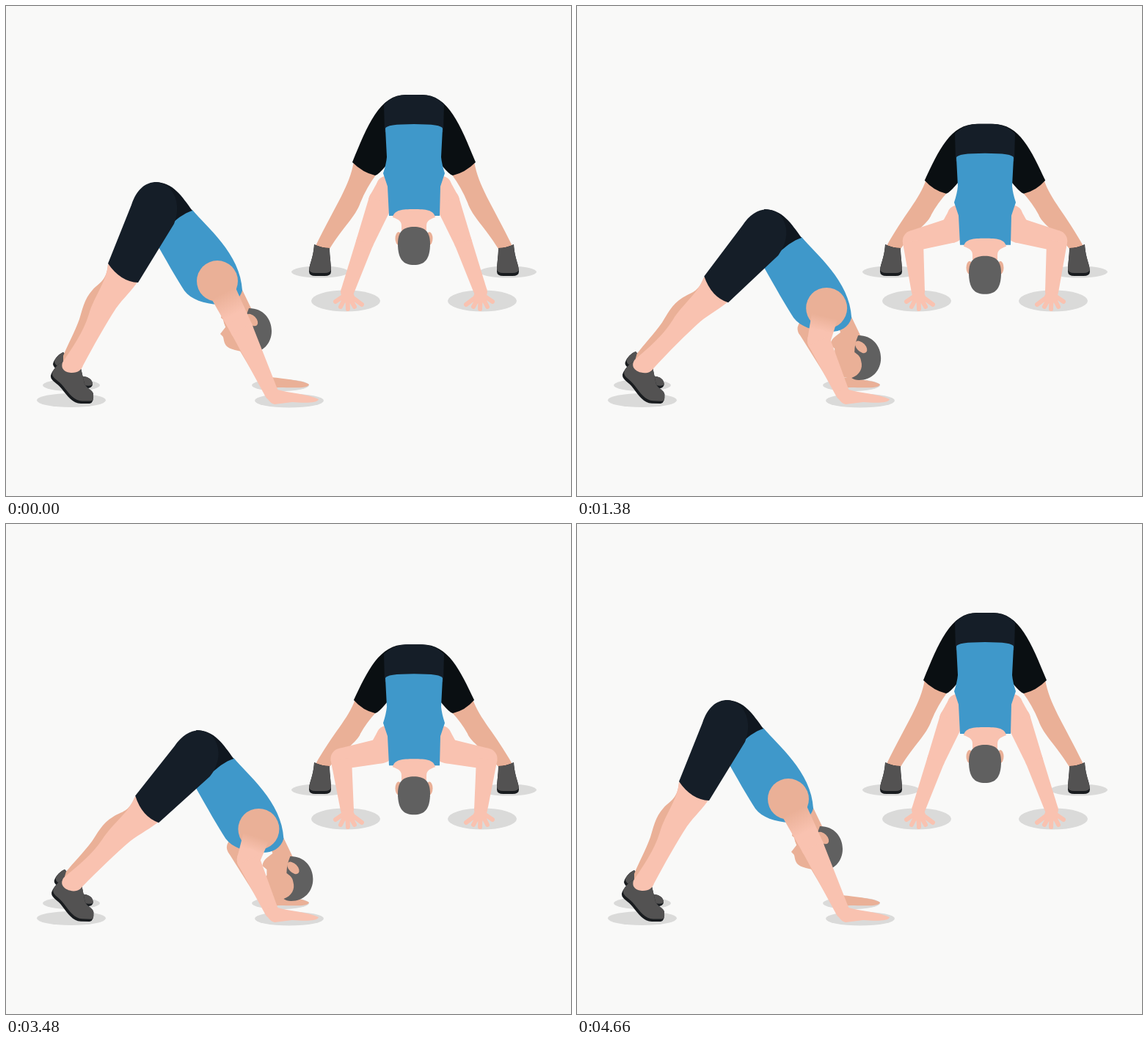
Recreate the animation shown at these times as an HTML page with a canvas. Size 770 by 668 pixels, loop 5.36 s.

```html
<!DOCTYPE html>
<html lang="en">
<head>
<meta charset="utf-8">
<title>Push-up exercise</title>
<style>
html, body { margin: 0; height: 100%; overflow: hidden; background: #f9f9f8; }
canvas { display: block; }
</style>
</head>
<body>
<canvas id="stage" width="770" height="668"></canvas>
<script>
const ctx = document.getElementById('stage').getContext('2d');
const LOOP = 5360, STEPS = 31, LEAN = 21.3 * Math.PI / 180;
const BG = '#f9f9f8', SHADE = '#dadad9', PINK = '#f9c2b0', TAN = '#eab097',
  BLUE = '#3f98ca', SHORTS = '#151e28', PELVIS = '#10171f', BLACK = '#0a0f12',
  HAIR = '#606060', SHOE = '#535252', SOLE = '#191c1f';

const mix = (a, b, p) => a + (b - a) * p;

function fill(path, color) {
  ctx.fillStyle = color;
  ctx.fill(new Path2D(path));
}

function oval(x, y, rx, ry, color, turn = 0) {
  ctx.fillStyle = color;
  ctx.beginPath();
  ctx.ellipse(x, y, rx, ry, turn, 0, 7);
  ctx.fill();
}

// Tapered limb through joints given as [x, y, radius].
function limb(joints, color) {
  joints.forEach(([x, y, r], i) => {
    oval(x, y, r, r, color);
    if (!i) return;
    const [px, py, pr] = joints[i - 1];
    const len = Math.hypot(x - px, y - py);
    const nx = (py - y) / len, ny = (x - px) / len;
    ctx.beginPath();
    ctx.moveTo(px + nx * pr, py + ny * pr);
    ctx.lineTo(x + nx * r, y + ny * r);
    ctx.lineTo(x - nx * r, y - ny * r);
    ctx.lineTo(px - nx * pr, py - ny * pr);
    ctx.fill();
  });
}

function moved(x, y, draw) {
  ctx.save();
  ctx.translate(x, y);
  draw();
  ctx.restore();
}

function turned(x, y, angle, draw) {
  ctx.save();
  ctx.translate(x, y);
  ctx.rotate(angle);
  ctx.translate(-x, -y);
  draw();
  ctx.restore();
}

function bothSides(draw) {
  draw();
  ctx.save();
  ctx.translate(1112, 0);
  ctx.scale(-1, 1);
  draw();
  ctx.restore();
}

function shoe(path, dx, dy) {
  fill(path, SOLE);
  ctx.save();
  ctx.clip(new Path2D(path));
  moved(dx, dy, () => fill(path, SHOE));
  ctx.restore();
}

function sideHead() {
  fill('M302 395L321 385L334 412L346 435L330 472C318 471 304 468 300 463C296 458 297 451 295 450L292 447L299 438V430L293 425C294 416 301 413 307 408Z', TAN);
  fill('M331 412C351 412 362 427 362 443C362 460 350 473 332 473Q326 473 322 470C333 466 338 457 335 447C334 440 330 438 326 435Q326 424 331 412Z', HAIR);
  oval(335, 428, 10, 6, TAN, 0.8);
}

function sideFigure(p) {
  const angle = LEAN * p, c = Math.cos(angle), s = Math.sin(angle);
  const dx = 113 * c + 215 * s - 113, dy = 113 * s - 215 * c + 215;
  const sx = 288 + dx, sy = 375 + dy;

  oval(89, 537.5, 47, 9.5, SHADE);
  oval(89, 517, 39, 8, SHADE);
  oval(386, 538, 47, 9.5, SHADE);
  oval(374, 517, 39, 8, SHADE);

  // far arm
  fill('M346 508L362 506C378 508 408 511 413 516C411 522 390 520 372 520L352 521Z', TAN);
  limb([[sx + 10, sy + 12, 13], [mix(309, 314, p), mix(430, 444, p), 12], [353, 512, 8]], TAN);

  turned(110, 540, p * 0.04, () =>
    shoe('M64 488C66 480 73 474 78 472L95 490L104 505C112 505 118 509 118 516Q117 522 108 521C94 520 85 506 72 496Q64 493 64 488Z', 2, -3.5));
  turned(90, 489, angle, () =>
    fill('M139 352C137 375 128 376 118 387C106 400 104 415 100 427C93 446 84 462 78 477V490L100 482L145 400Z', TAN));
  turned(110, 540, p * 0.04, () =>
    shoe('M78 485C70 487 61 500 61 505C61 511 70 514 76 522C84 532 91 542 102 542H114Q120 541 119 529C118 523 110 522 107 515L102 494Z', 2, -3.5));

  moved(dx, dy, () => {
    sideHead();
    fill('M254 278C272 300 320 338 322 388C318 402 305 408 290 407C270 406 252 400 243 388C232 371 219 348 202 318L225 290Z', BLUE);
    fill('M203 240C228 240 240 260 254 279C238 284 226 296 201 320L182 290Z', PELVIS);
    oval(288, 375, 28, 28, TAN);
  });

  turned(90, 489, angle, () => {
    fill('M139 352C138 374 120 396 113 420C105 446 90 466 77 486C74 496 82 500 90 500C98 500 103 496 105 490C120 462 135 435 150 412C160 398 172 388 182 372Z', PINK);
    fill('M139 351L171 271C178 250 190 240 205 240C226 241 241 268 229 297L180 377Q156 376 139 351Z', SHORTS);
  });

  // near arm
  const ex = mix(321, 333, p), ey = mix(440, 463, p);
  const skin = ctx.createLinearGradient(sx, sy, ex, ey);
  skin.addColorStop(0.25, TAN);
  skin.addColorStop(0.7, PINK);
  limb([[sx, sy, 19], [ex, ey, 15.5]], skin);
  limb([[ex, ey, 15.5], [362, 528, 9.5]], PINK);
  fill('M352 525L370 523C388 528 412 529 426 536C425 542 404 541 390 540L366 543Q357 541 352 525Z', PINK);
}

function frontFigure(p) {
  const dy = 56 * p, knee = 35 * p, hem = 472 + 2.5 * p;

  bothSides(() => {
    oval(428, 362.5, 39, 8, SHADE);
    oval(463, 402, 47, 14.5, SHADE);

    // leg
    fill(`M${hem + 2} ${212 + knee}C${mix(468, 466, p)} ${mix(246, 272, p)} ${mix(452, 444, p)} ${mix(266, 290, p)} 421 329L441 331C${mix(460, 458, p)} ${mix(300, 312, p)} ${mix(476, 480, p)} ${mix(288, 300, p)} 483 ${mix(268, 291, p)}Q491 ${mix(248, 278, p)} 505 ${229 + knee}Z`, TAN);
    shoe('M420 325Q430 330 441 330C441 342 443 350 443 362Q443 368 434 368H422Q413 368 413 362C413 352 419 344 420 325Z', 0, -4);
    fill(`M556 ${121 + dy}H545C509 ${121 + dy} 493 ${162 + 49 * p} ${hem} ${213 + knee}Q486 ${227 + knee} 503 ${231 + knee}Q508 ${230 + knee} 520 ${215 + knee}L556 ${150 + dy}Z`, BLACK);

    // arm and hand
    const elbow = 455 + 34 * (1 - p) ** 2;
    limb([[518, 245 + dy, 13], [511, 266 + dy, 17], [elbow, mix(322, 319.5, p), mix(12, 15, p)], [465, 390, 9]], PINK);
    ctx.strokeStyle = PINK;
    ctx.lineWidth = 6;
    ctx.lineCap = 'round';
    ctx.beginPath();
    for (const [x, y] of [[449, 403], [456, 410], [466, 413], [475, 410], [485, 407]]) {
      ctx.moveTo(465, 392);
      ctx.lineTo(x, y);
    }
    ctx.stroke();
    oval(466, 397, 9, 8, PINK);
  });

  moved(0, dy, () => {
    fill('M515 134Q528 121 548 121H564Q584 121 597 134L596 172H516Z', SHORTS);
    fill('M517 167Q518 161 556 161Q594 161 595 167L593 206Q594 216 598 228L592 246L591 286H522L520 246L514 228Q518 216 519 206Z', BLUE);
    fill('M527 288C529 278 540 277 556 277C572 277 583 278 585 288C577 291 573 293 573 300V318H539V300C539 293 535 291 527 288Z', PINK);
    bothSides(() => oval(535, 317, 4.5, 9, TAN));
    fill('M534 324C534 307 542 301 556 301C570 301 578 307 578 324C578 346 570 353 556 353C542 353 534 346 534 324Z', HAIR);
  });
}

// Poses advance in groups of three: two short holds, then a long one.
function progress(t, start) {
  if (t < start) return 0;
  const rest = (t - start) % 140;
  const step = 3 * Math.floor((t - start) / 140) + 1 + (rest >= 20) + (rest >= 40);
  return Math.min(1, step / STEPS);
}

function draw(now) {
  const t = now % LOOP;
  const p = progress(t, 400) - progress(t, 3200);
  ctx.fillStyle = BG;
  ctx.fillRect(0, 0, 770, 668);
  frontFigure(p);
  sideFigure(p);
}

let begin;
function tick(now) {
  begin ??= now;
  draw(now - begin);
  requestAnimationFrame(tick);
}
draw(0);
requestAnimationFrame(tick);
</script>
</body>
</html>
```
